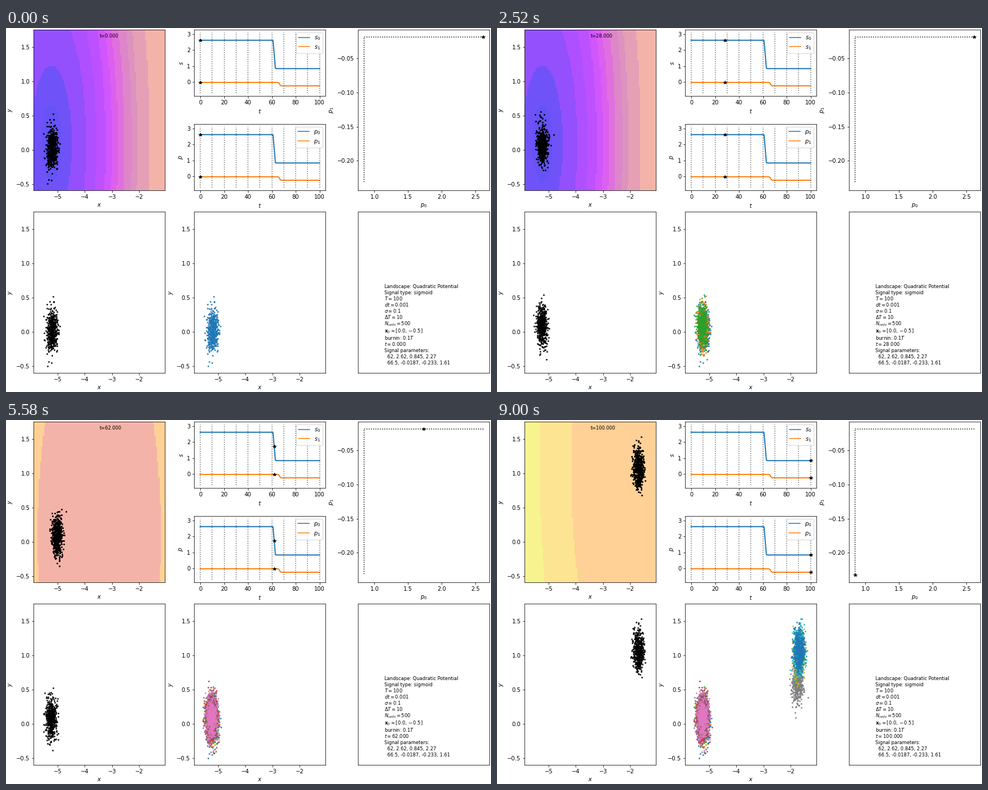
A matplotlib script for the animation above (9090 ms loop, 864 by 648 pixels).

```python
import numpy as np
import matplotlib.pyplot as plt
from matplotlib.animation import FuncAnimation
from matplotlib.colors import to_rgb

W, H = 864, 648
COLS = (49.4, 335.4, 627.2)
COL_W = 233.8
UPPER, LOWER = (3, 289.4), (327.4, 613.8)
T_END, SNAP = 100, 10
N_CELLS, SIGMA, BURNIN = 500, 0.1, 10
KX, KY = 0.5, 0.215
XLIM, YLIM = (-5.878, -1.055), (-0.595, 1.752)

# Colour bands of the potential
LEVELS = [-6.83, -6.725, -6.45, -6.16, -5.85, -5.59, -5.345,
          -5.025, -4.645, -4.325, -3.55, -1.7, 0.7, 2.46]
BANDS = np.array([to_rgb(c) for c in (
    "#6553f7", "#7052f9", "#9450fd", "#ae50ff", "#bd51ff",
    "#d056fd", "#dc60ef", "#e070df", "#dd86c9", "#dd92bf",
    "#e6a0b6", "#f4b3a9", "#ffd196", "#fde492", "#f7f38f")])


def sigmoid(t, t0, a, b, rate):
    return a + (b - a) * 0.5 * (1 + np.tanh(rate * (t - t0)))


def signal(t):
    return (sigmoid(t, 62, 2.62, 0.845, 2.27),
            sigmoid(t, 66.5, -0.0187, -0.233, 1.61))


def simulate(dt=0.05):
    """Noisy gradient descent; returns the cells at each whole time."""
    rng = np.random.default_rng(3)
    cells = np.tile([[0.0], [-0.5]], (1, N_CELLS))
    k = np.array([[KX], [KY]])
    per_unit = round(1 / dt)
    states = []
    for i in range(-BURNIN * per_unit, T_END * per_unit + 1):
        if i >= 0 and i % per_unit == 0:
            states.append(cells.copy())
        p = np.array(signal(max(i * dt, 0.0)))[:, None]
        noise = rng.standard_normal(cells.shape)
        cells = cells - (k * cells + p) * dt + SIGMA * np.sqrt(dt) * noise
    return states


def landscape(t, n=100):
    x = np.linspace(*XLIM, n)[None, :]
    y = np.linspace(*YLIM, n)[:, None]
    p0, p1 = signal(t)
    phi = 0.5 * KX * x**2 + 0.5 * KY * y**2 + p0 * x + p1 * y
    return BANDS[np.digitize(phi, LEVELS)]


INFO = [
    "Landscape: Quadratic Potential",
    "Signal type: sigmoid",
    "$T=100$",
    "$dt=0.001$",
    r"$\sigma=0.1$",
    r"$\Delta T=10$",
    "$N_{cells}=500$",
    r"$\mathbf{x}_0=[0.0, -0.5]$",
    "burnin: $0.1T$",
    "$t=0.000$",
    "Signal parameters:",
    "  62, 2.62, 0.845, 2.27",
    "  66.5, -0.0187, -0.233, 1.61",
]

fig = plt.figure(figsize=(W / 72, H / 72), dpi=72)


def panel(col, rows, xlabel="", ylabel=""):
    top, bottom = rows
    ax = fig.add_axes([COLS[col] / W, 1 - bottom / H,
                       COL_W / W, (bottom - top) / H])
    ax.set_xlabel(xlabel)
    ax.set_ylabel(ylabel)
    return ax


def plane(col, rows):
    ax = panel(col, rows, "$x$", "$y$")
    ax.set(xlim=XLIM, ylim=YLIM, xticks=range(-5, -1),
           yticks=np.arange(-0.5, 1.6, 0.5))
    return ax


def dots(ax, color, alpha=1.0):
    return ax.plot([], [], "o", ms=3, mew=0, color=color, alpha=alpha)[0]


def star(ax):
    return ax.plot([], [], "k*", ms=6, zorder=5)[0]


def signal_panel(rows, name):
    ax = panel(1, rows, "$t$", f"${name}$")
    t = np.arange(T_END + 1)
    for i, values in enumerate(signal(t)):
        ax.plot(t, values, label=f"${name}_{i}$")
    ax.vlines(np.arange(0, T_END + 1, SNAP), -0.69, 3.09,
              colors="k", linestyles=":", alpha=0.6)
    ax.set(xlim=(-5, 105), ylim=(-0.88, 3.28), yticks=range(4))
    ax.legend(loc="upper right")
    plt.setp(ax.lines, linewidth=2)  # heavier than the legend samples
    return ax


def write_info(ax):
    """Stack the lines upwards, with more room below subscripts."""
    ax.set(xticks=[], yticks=[])
    y = 0.05 * (LOWER[1] - LOWER[0])
    texts = []
    for line in reversed(INFO):
        y += 2 * ("_" in line)
        texts.append(ax.annotate(line, (0.2, 0), xycoords="axes fraction",
                                 xytext=(0, y), textcoords="offset points",
                                 fontsize="small"))
        y += 11
    return texts[::-1]


states = simulate()

ax_land = plane(0, UPPER)
image = ax_land.imshow(landscape(0), origin="lower", aspect="auto",
                       extent=(*XLIM, *YLIM), interpolation="nearest")
cells_now = dots(ax_land, "k")
clock = ax_land.text(0.5, 0.95, "", fontsize="small",
                     transform=ax_land.transAxes)

signal_stars = [star(signal_panel((3, 121.4), "s")),
                star(signal_panel((171, 289.4), "p"))]

ax_param = panel(2, UPPER, "$p_0$", "$p_1$")
ax_param.plot(*signal(np.arange(T_END + 1)), "k:")
param_star = star(ax_param)

cells_snap = dots(plane(0, LOWER), "k", 0.85)
ax_hist = plane(1, LOWER)
history = [dots(ax_hist, f"C{i % 10}", 0.85)
           for i in range(T_END // SNAP + 1)]
for i, line in enumerate(history):
    line.set_data(*states[i * SNAP])

time_note = write_info(panel(2, LOWER))[INFO.index("$t=0.000$")]


def update(t):
    p0, p1 = signal(t)
    image.set_data(landscape(t))
    cells_now.set_data(*states[t])
    clock.set_text(f"t={t:.3f}")
    for marker in signal_stars:
        marker.set_data([t, t], [p0, p1])
    param_star.set_data([p0], [p1])
    cells_snap.set_data(*states[t // SNAP * SNAP])
    for i, line in enumerate(history):
        line.set_visible(i * SNAP <= t)
    time_note.set_text(f"$t={t:.3f}$")
    return []


anim = FuncAnimation(fig, update, frames=T_END + 1, interval=90,
                     init_func=lambda: update(0), repeat=True, blit=False)
plt.show()
```
